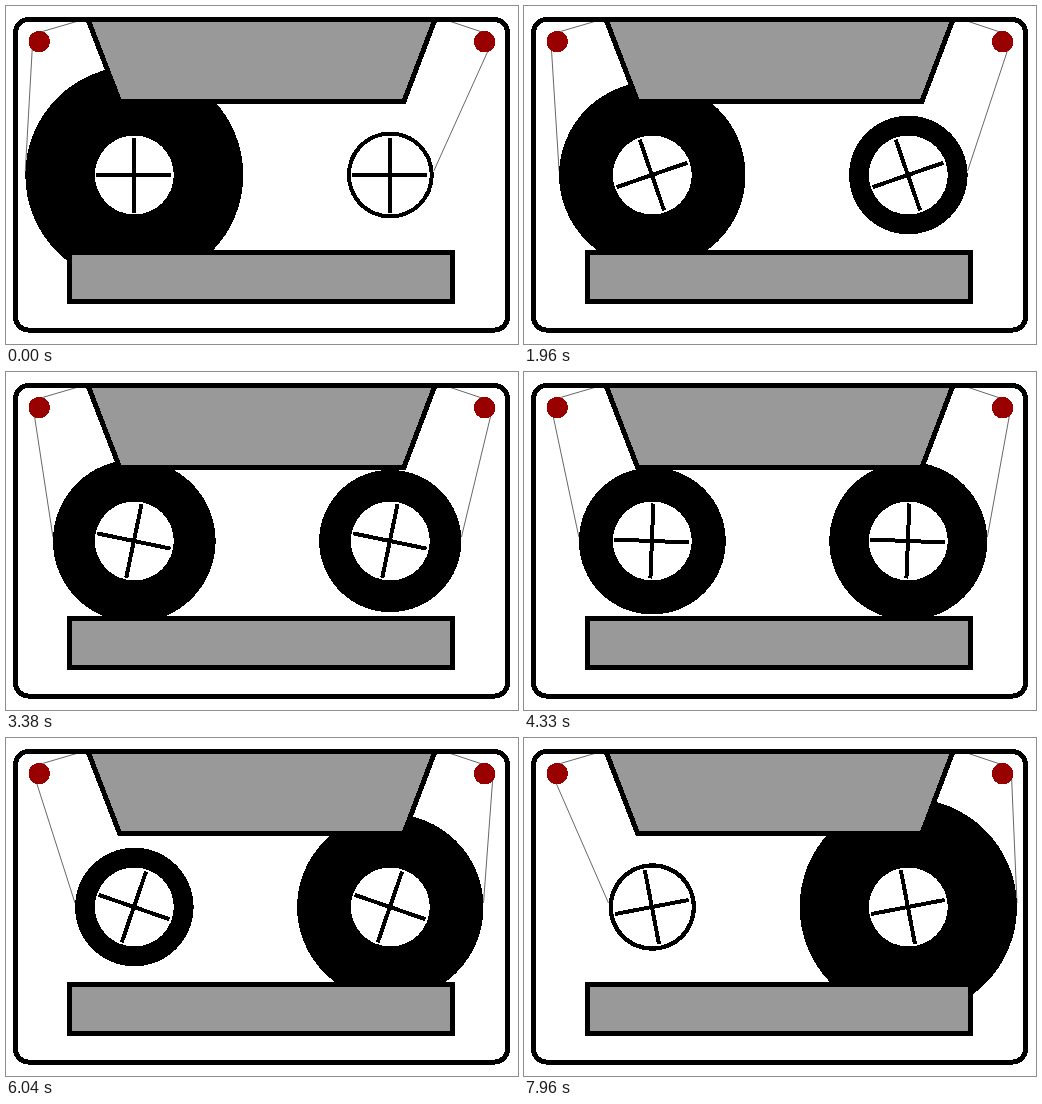
Write an HTML page that moves like this. It is 512x338 px and loops after 8 s.

```html
<!DOCTYPE html>
<html lang="en">
<head>
<meta charset="utf-8">
<title>Cassette</title>
<style>
  html, body { margin: 0; width: 100%; height: 100%; overflow: hidden; background: #fff; }
  svg { display: block; width: 512px; height: 338px; shape-rendering: crispEdges; }
  .outline { stroke: #000; stroke-width: 5; }
  .tape { stroke: #000; stroke-width: .6; shape-rendering: geometricPrecision; }
  .spokes { stroke: #000; stroke-width: 4; }
  .roller { fill: #900; }
  .grey { fill: #999; }
</style>
</head>
<body>
<svg viewBox="0 0 512 338">
  <defs>
    <path id="cross" class="spokes" d="M-37.5 0H37.5M0-37.5V37.5"/>
  </defs>
  <rect class="outline" x="9.5" y="13.5" width="492" height="310.5" rx="13" fill="#fff"/>
  <path class="tape" d="M33 26.5L74 14.5M443 15L478 26.7"/>
  <line class="tape" id="leftTape" x1="26.8" y1="33" y2="165"/>
  <line class="tape" id="rightTape" x1="487.3" y1="33" y2="165"/>
  <g transform="translate(128.3 169)">
    <circle id="leftReel"/>
    <circle r="39.5" fill="#fff"/>
    <use href="#cross" id="leftCross"/>
  </g>
  <g transform="translate(384.3 169)">
    <circle id="rightReel"/>
    <circle r="39.5" fill="#fff"/>
    <use href="#cross" id="rightCross"/>
  </g>
  <circle class="roller" cx="33.2" cy="35.7" r="10.7"/>
  <circle class="roller" cx="478.6" cy="35.7" r="10.7"/>
  <path class="outline grey" d="M82 13.5H429L398 95.2H113.5Z"/>
  <rect class="outline grey" x="63.8" y="246.5" width="383" height="48.5"/>
</svg>
<script>
  const LOOP = 8000, LAST_POSE = 199, TURNS = 6;
  const FULL = 109, EMPTY = 43.5;
  const LEFT_X = 128.3, RIGHT_X = 384.3;
  const set = (id, name, value) => document.getElementById(id).setAttribute(name, value);

  // Poses run at 25 per second, shown 24 times a second on a 10 ms clock.
  function poseAt(ms) {
    const tick = Math.floor(ms / 10) * 10;
    const shown = Math.floor((tick + 4.99) * 24 / 1000);
    return Math.floor(shown * 25 / 24);
  }

  function draw(ms) {
    const progress = poseAt(ms) / LAST_POSE;
    const wound = (FULL - EMPTY) * progress;
    const left = FULL - wound, right = EMPTY + wound;
    const spin = `translate(-.4 0) rotate(${360 * TURNS * progress})`;
    set('leftReel', 'r', left);
    set('rightReel', 'r', right);
    set('leftTape', 'x2', LEFT_X - left);
    set('rightTape', 'x2', RIGHT_X + right);
    set('leftCross', 'transform', spin);
    set('rightCross', 'transform', spin);
  }

  const start = performance.now();
  function frame() {
    draw((performance.now() - start) % LOOP);
    requestAnimationFrame(frame);
  }
  frame();
</script>
</body>
</html>
```
